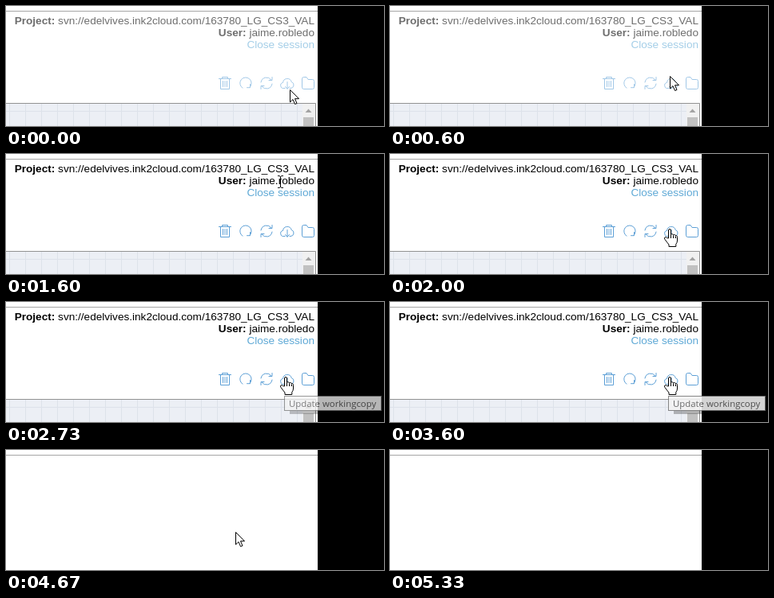
Recreate the animation shown at these times as an HTML page. Size 473 px wide and 151 px high, loop 5540 ms.

```html
<!DOCTYPE html>
<html lang="en">
<head>
<meta charset="utf-8">
<title>Update working copy</title>
<style>
  html, body { margin: 0; width: 100%; height: 100%; overflow: hidden; background: #fff; }
  svg { display: block; width: 473px; height: 151px; }
  .info { font: 13.6px "Liberation Sans", Arial, sans-serif; text-anchor: end; }
  .info .label { font-weight: bold; }
  .info .link { fill: #5fa9d6; }
  .icons { fill: none; stroke: #5c9fd6; stroke-linejoin: round; stroke-linecap: round; }
  .tip text { font: 11.4px "Open Sans", sans-serif; fill: #575757; }
  .cursor { fill: #fff; stroke: #000; stroke-linejoin: round; }
</style>
</head>
<body>
<svg viewBox="0 0 473 151">
  <defs>
    <pattern id="grid" x="4" y="132" width="20" height="20" patternUnits="userSpaceOnUse">
      <rect width="20" height="20" fill="#eceff5"/>
      <path d="M.5 0V20M0 .5H20" stroke="#dde2ea"/>
    </pattern>
  </defs>

  <rect width="473" height="151" fill="#fff"/>
  <path d="M0 6.5H390" stroke="#a6a6a6"/>

  <g id="page">
    <g id="content">
      <g class="info">
        <text x="386" y="23"><tspan class="label">Project:</tspan> svn://edelvives.ink2cloud.com/163780_LG_CS3_VAL</text>
        <text x="386" y="38"><tspan class="label">User:</tspan> jaime.robledo</text>
        <text x="386" y="53" class="link">Close session</text>
      </g>
      <g class="icons">
        <path d="M266.5 91.5H281.5M270.5 91V89.5H277.5V91M268.5 92V104.5H279.5V92M271.5 94.5V101.5M274 94.5V101.5M276.5 94.5V101.5"/>
        <path d="M296 103.2A7.2 7.2 0 1 1 305 102.3M305.5 98.5V102.7H301.5"/>
        <path d="M319 96A7.2 7.2 0 0 1 332 93M333 89.5V93.5H329M333 98A7.2 7.2 0 0 1 320 101M319 104.5V100.5H323"/>
        <path d="M349 103.5H348A3.6 3.6 0 0 1 346.6 96.4A5.4 5.4 0 0 1 357.2 95.5A4.1 4.1 0 0 1 356 103.5H355M352 95.5V104M349.5 101.5L352 104.3L354.5 101.5"/>
        <path d="M370.5 91.5Q370.5 89.5 372.5 89.5H376L378 92.5H383.5Q385.5 92.5 385.5 94.5V102.5Q385.5 104.5 383.5 104.5H372.5Q370.5 104.5 370.5 102.5Z"/>
      </g>
    </g>
    <rect y="123" width="371" height="28" fill="url(#grid)"/>
    <rect x="371" y="123" width="16" height="28" fill="#f1f1f1"/>
    <path d="M374.5 134L378.5 129.5L382.5 134Z" fill="#a3a3a3"/>
    <rect x="372" y="140" width="13" height="11" fill="#c1c1c1"/>
    <path d="M0 122.5H387.5V151" fill="none" stroke="#929292"/>
  </g>

  <rect x="390" width="83" height="151" fill="#000"/>

  <g id="tip" class="tip">
    <path d="M355 137H471V141H355Z" fill="#000" opacity=".3"/>
    <rect x="348.5" y="118.5" width="121" height="18" fill="#f3f3f3" stroke="#767676"/>
    <text x="354" y="132">Update workingcopy</text>
  </g>

  <g id="cursor" class="cursor">
    <path id="arrow" d="M.5 .5V16L4 12.6L6.6 18.5L9 17.5L6.5 11.7H11.5Z"/>
    <path id="beam" fill="none" d="M-3 -7.5H-1L.5 -6.5L2 -7.5H4M.5 -6.5V6.5M-3 7.5H-1L.5 6.5L2 7.5H4"/>
    <g id="hand">
      <path d="M.5 13V3Q.5 1.5 2 1.5T3.5 3V8.5Q4 7.5 5.3 7.8T6.5 9.2Q7.2 8.2 8.4 8.6T9.5 10Q10.2 9.3 11 9.9T11.5 11.5V16Q11.5 18.5 9.8 20.5V23.5H1V21Q-1.5 18 -4 14.5Q-5.2 12.5 -4 11.8T-1.5 12.5Z"/>
      <path fill="none" d="M3.5 8.5V13M6.5 9.5V13M9.5 10.5V13"/>
    </g>
  </g>
</svg>

<script>
const LOOP = 5540, TICK = 1000 / 15;
const $ = id => document.getElementById(id);

// tick, x, y, shape
const path = [
  [0, 355, 105, 'arrow'], [1, 350, 102, 'arrow'], [2, 347, 101, 'arrow'], [8, 347, 101, 'arrow'],
  [9, 350, 88, 'arrow'], [10, 352, 64, 'arrow'], [11, 352, 47, 'arrow'], [12, 352, 47, 'arrow'],
  [14, 348, 41, 'beam'], [16, 346, 37, 'beam'], [22, 346, 37, 'beam'], [23, 342, 30, 'beam'],
  [24, 343, 35, 'beam'], [25, 344, 44, 'hand'], [26, 345, 57, 'arrow'], [29, 348, 90, 'hand'],
  [30, 348, 93, 'hand'], [55, 348, 93, 'arrow'], [67, 348, 93, 'arrow'], [69, 328, 97, 'arrow'],
  [73, 164, 122, 'arrow'], [76, 72, 140, 'arrow'], [77, 60, 146, 'arrow'], [78, 50, 152, 'arrow']
];
const contentFade = [[16, .57], [17, .63], [19, 1]];
const tipFade = [[37, 0], [41, 1], [53, 1], [54, .87], [57, .13], [58, 0]];

// Linear value of column col at tick k, held at both ends.
function at(keys, k, col = 1) {
  const i = keys.findIndex(key => key[0] > k);
  if (i < 0) return keys[keys.length - 1][col];
  if (i === 0) return keys[0][col];
  const a = keys[i - 1], b = keys[i];
  return a[col] + (b[col] - a[col]) * (k - a[0]) / (b[0] - a[0]);
}

function draw(time) {
  const k = Math.floor((time % LOOP) / TICK);
  const shape = path.filter(key => key[0] <= k).pop()[3];
  const x = Math.round(at(path, k)), y = Math.round(at(path, k, 2));
  $('cursor').setAttribute('transform', `translate(${x} ${y})`);
  for (const id of ['arrow', 'beam', 'hand']) $(id).style.display = id === shape ? '' : 'none';
  $('content').style.opacity = at(contentFade, k);
  $('tip').style.opacity = at(tipFade, k);
  $('page').style.display = k < 55 ? '' : 'none';
}

const start = performance.now();
function loop(now) {
  draw(Math.max(0, now - start));
  requestAnimationFrame(loop);
}
draw(0);
requestAnimationFrame(loop);
</script>
</body>
</html>
```
